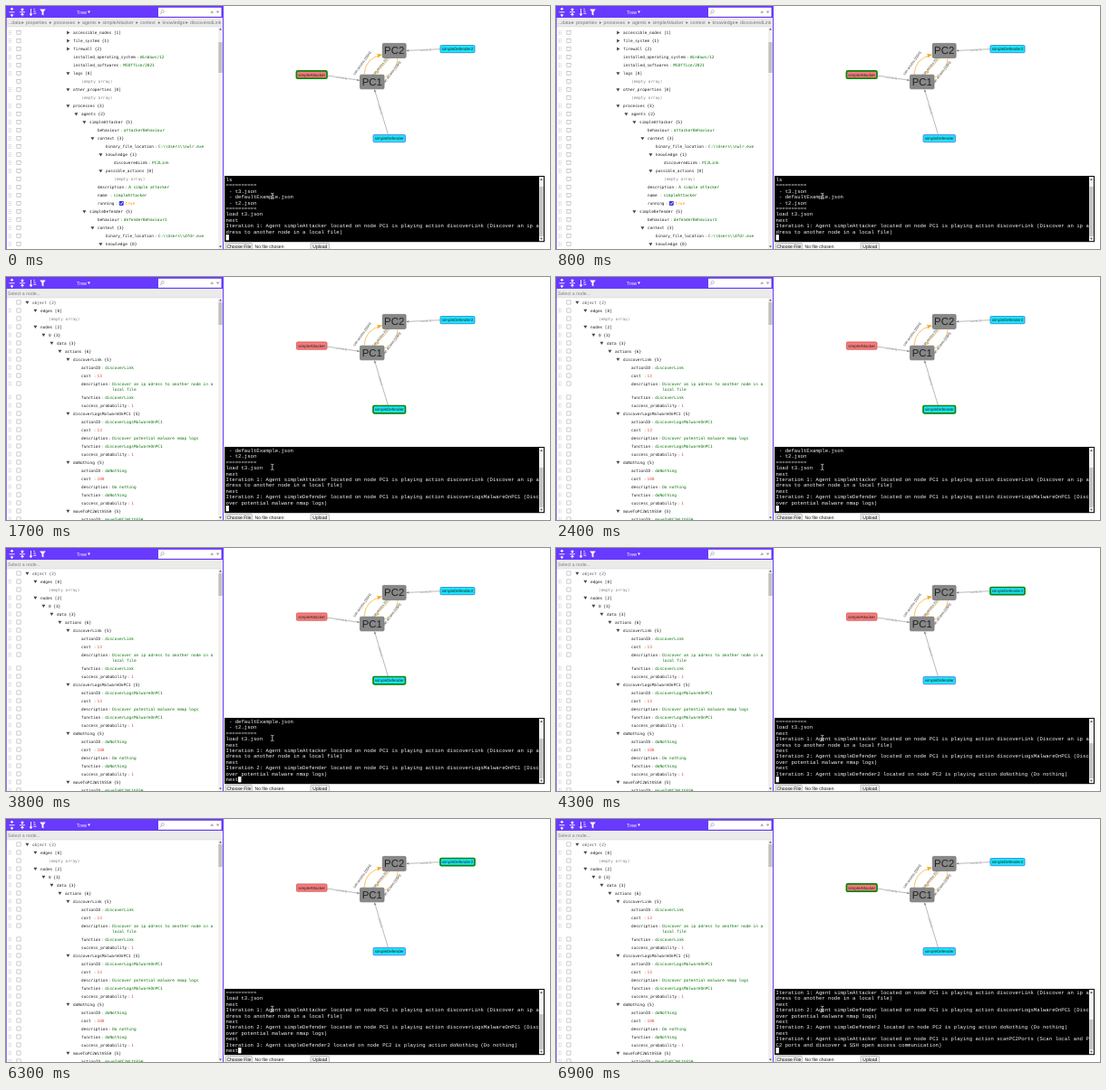
An HTML page that plays this animation: 600x269 px, repeating every 7000 ms.

```html
<!DOCTYPE html>
<html lang="en">
<head>
<meta charset="utf-8">
<title>Agent simulation</title>
<style>
html, body { margin: 0; width: 100%; height: 100%; overflow: hidden; background: #fff; }
svg { display: block; width: 100vw; height: 100vh; }
text { font-family: "Liberation Sans", Arial, sans-serif; white-space: pre; text-rendering: geometricPrecision; }
.tree text { font: 4.4px "DejaVu Sans Mono", monospace; }
.term text { font: 5.65px "Liberation Mono", monospace; }
</style>
</head>
<body>
<svg id="stage" viewBox="0 0 600 269" preserveAspectRatio="none"></svg>
<script>
const LOOP = 7000, COLS = 102, ROWS = 11, LINE = 6.4, CHAR = 3.39, CELL = 2.65;
const INK = '#1a1a1a', GREEN = '#007000', RED = '#ee422e', GRAY = '#808080', VIOLET = '#683aff';

const esc = s => String(s).replace(/&/g, '&amp;').replace(/</g, '&lt;');
const text = (x, y, s, fill = INK, more = '') => `<text x="${x}" y="${y}" fill="${fill}" ${more}>${esc(s)}</text>`;
const rect = (x, y, w, h, fill, more = '') => `<rect x="${x}" y="${y}" width="${w}" height="${h}" fill="${fill}" ${more}/>`;
const path = (d, stroke, width = 0.6, fill = 'none') => `<path d="${d}" stroke="${stroke}" stroke-width="${width}" fill="${fill}"/>`;
const shape = (d, fill) => path(d, 'none', 0, fill);

// Tree rows: [level, key, value]; containers have an open flag ('+' or '-') before the key.
const agent = (name, behaviour) => [
  [7, '-' + name + ' {5}'],
  [8, 'behaviour', behaviour],
  [8, '-context {3}']
];
const scrolledTree = [
  [5, '+accessible_nodes [1]'], [5, '+file_system {1}'], [5, '+firewall {2}'],
  [5, 'installed_operating_system', 'Windows/12'], [5, 'installed_softwares', 'MSOffice/2021'],
  [5, '-logs [0]'], [6], [5, '-other_properties [0]'], [6],
  [5, '-processes {3}'], [6, '-agents {2}'],
  ...agent('simpleAttacker', 'attackerBehaviour'),
  [9, 'binary_file_location', 'C:\\\\Users\\\\nwlr.exe'],
  [9, '-knowledge {1}'], [10, 'discoveredLink', 'PC2Link'],
  [9, '-possible_actions [0]'], [10],
  [8, 'description', 'A simple attacker'], [8, 'name', 'simpleAttacker'], [8, 'running', true],
  ...agent('simpleDefender', 'defenderBehaviour1'),
  [9, 'binary_file_location', 'C:\\\\Users\\\\dfdr.exe'],
  [9, '-knowledge {0}']
];
const action = (name, cost, ...about) => [
  [5, `-${name} {5}`], [6, 'actionID', name], [6, 'cost', cost],
  [6, 'description', ...about], [6, 'function', name], [6, 'success_probability', 1]
];
const topTree = [
  [0, '-object {2}'], [1, '-edges [0]'], [2], [1, '-nodes [2]'],
  [2, '-0 {3}'], [3, '-data {3}'], [4, '-actions {6}'],
  ...action('discoverLink', 13, 'Discover an ip adress to another node in a', 'local file'),
  ...action('discoverLogsMalwareOnPC1', 13, 'Discover potential malware nmap logs'),
  ...action('doNothing', 100, 'Do nothing'),
  ...action('moveToPC2WithSSH', 13, 'Move to PC2').slice(0, 2)
];

function rowGutter(y, drag) {
  let out = rect(11.9, y - 2.1, 4.2, 4.2, '#fff', 'stroke="#999" stroke-width=".5"');
  if (drag) for (let i = 0; i < 6; i++) out += rect(3 + i % 2 * 1.8, y - 2.2 + (i >> 1) * 1.8, 0.9, 0.9, '#bbb');
  return out;
}

function treeRow([level, key, value, more], y) {
  const x = 29 + level * 9, base = y + 1.5;
  let out = rowGutter(y, key && level);
  if (!key) return out + text(x, base, '(empty array)', GRAY);
  if (value === undefined) {
    const d = key[0] === '-' ? `M${x - 7.6} ${y - 1.3}h4l-2 3.2z` : `M${x - 6.8} ${y - 2}v4l3.2-2z`;
    return out + shape(d, '#444') + text(x, base, key.slice(1), level ? INK : '#555');
  }
  const end = x + Math.max(12.5, key.length * CELL);
  out += text(x, base, key) + text(end + 1.2, base, ':', GRAY);
  if (value === true) {
    return out + rect(end + 5.2, y - 2.6, 5, 5, '#3b3bdc', 'rx=".8"')
      + path(`M${end + 6.3} ${y}l1.1 1.2 1.8-2.6`, '#fff', 0.8) + text(end + 12, base, 'true', '#ff8c00');
  }
  out += text(end + 5, base, value, typeof value === 'number' ? RED : GREEN);
  return more ? out + text(end + 5, base + 6.2, more, GREEN) : out;
}

function treePanel(atTop) {
  let y = atTop ? 28 : 29.5, out = '';
  for (const row of atTop ? topTree : scrolledTree) {
    out += treeRow(row, y);
    y += row[3] ? 15 : 9;
  }
  out = `<g class="tree">${out}</g>` + rect(0, 13, 239, 10, '#ebebeb') + rect(0, 22.7, 239, 0.5, '#d3d3d3');
  if (atTop) {
    out += text(2, 20.2, 'Select a node...', '#808080', 'font-size="5.2"');
  } else {
    const crumbs = { '...data': 2, properties: 22, processes: 52.5, agents: 84, simpleAttacker: 106.5, context: 148, knowledge: 172.5, discoveredLink: 203 };
    for (const [name, x] of Object.entries(crumbs)) {
      out += text(x, 20.2, name, '#777', 'font-size="5.2"');
      if (x > 2) out += shape(`M${x - 4.6} 16.9v3l2.4-1.5z`, '#777');
    }
  }
  out += rect(234, 23.2, 5, 246, '#f1f1f1') + rect(234.4, atTop ? 28 : 40, 4.2, atTop ? 25 : 34, '#c1c1c1');
  out += shape('M235 26.6h3l-1.5-2z', '#555') + shape('M235 265.5h3l-1.5 2z', '#555');
  return out + toolbar();
}

function toolbar() {
  const arrows = (x, up, down) => path(`M${x - 3} 6.8h6M${x} 2.2v2.6M${x} 8.8v2.6`, '#fff', 0.9)
    + shape(`M${x - 2} ${up[0]}h4l-2 ${up[1]}zM${x - 2} ${down[0]}h4l-2 ${down[1]}z`, '#fff');
  return rect(0, 0, 240, 13, VIOLET) + rect(0, 13, 0.7, 256, VIOLET) + rect(239, 13, 1, 256, VIOLET)
    + arrows(6.5, [4, -2.4], [9.6, 2.4]) + arrows(18, [3.6, 2.4], [10, -2.4])
    + path('M27.5 3v7.4M30.4 3.6h1.4M30.4 5.9h2.2M30.4 8.2h3', '#fff', 0.9) + shape('M25.6 8.6h3.8l-1.9 2.6z', '#fff')
    + shape('M37.2 3.4h6.6l-2.4 3.2v4l-1.8-1.2v-2.8z', '#fff')
    + text(78, 8.6, 'Tree', '#fff', 'font-size="5.4"') + shape('M90 5.6h3l-1.5 2.4z', '#fff')
    + rect(168, 1.8, 69.5, 10, '#fff')
    + '<circle cx="172.7" cy="6" r="1.6" fill="none" stroke="#aaa" stroke-width=".7"/>'
    + path('M171.6 7.2l-2 2.2', '#aaa', 0.9)
    + shape('M225.2 7.8h4l-2-2.8zM231.6 5.4h4l-2 2.8z', '#aaa');
}

// Network view
const label = (x, y, angle, s, size = 3.2, fill = '#555') =>
  text(0, 1, s, fill, `font-size="${size}" text-anchor="middle" transform="translate(${x} ${y}) rotate(${angle})" stroke="#fff" stroke-width=".7" paint-order="stroke"`);
const head = (x, y, angle, size, fill) =>
  `<path d="M0 0L${-size} ${-size * 0.4}L${-size * 0.8} 0L${-size} ${size * 0.4}z" fill="${fill}" transform="translate(${x} ${y}) rotate(${angle})"/>`;

function link(x1, y1, x2, y2, lx, ly) {
  const angle = Math.atan2(y2 - y1, x2 - x1) * 180 / Math.PI;
  const upright = Math.abs(angle) > 90 ? angle + 180 : angle;
  return path(`M${x1} ${y1}L${x2} ${y2}`, '#8a8a8a', 0.6) + head(x2, y2, angle, 3, '#777') + label(lx, ly, upright, 'connects');
}

function box(x, y, w, h, name, fill, border, selected, size = 4.55) {
  const stroke = selected ? '#0a850a' : border;
  return rect(x, y, w, h, fill, `rx="1.3" stroke="${stroke}" stroke-width="${selected ? 1.7 : 0.8}"`)
    + text(x + w / 2, y + h / 2 + size * 0.35, name, '#222', `font-size="${size}" text-anchor="middle"`);
}

function network(active) {
  const orange = '#f5a81c', cyan = '#19e6f7', access = 'can access (SSH)';
  return link(354, 77, 390, 82.3, 370, 79.5)
    + link(479, 47.7, 441.5, 49.4, 463, 48.5)
    + link(421.5, 142.5, 406.5, 92.5, 413, 114.5)
    + path('M395 76Q396 58 414 54', orange, 0.7) + head(415, 53.8, -12, 6, orange)
    + path('M407 76L423 58', orange, 0.7) + head(407.5, 75.5, 131, 5, orange)
    + path('M432 58Q432 71 418 79', orange, 0.7) + head(431.8, 62, -80, 5, orange)
    + label(393, 63.5, -54, access, 3.9, '#333')
    + label(414, 65.5, -50, access, 3.6, '#333')
    + label(425.5, 74, -52, access, 3.9, '#333')
    + box(390.5, 76.2, 26.5, 15.6, 'PC1', '#888', '#777', false, 11.4)
    + box(415.3, 41.4, 25.8, 16, 'PC2', '#888', '#777', false, 11.4)
    + box(320.4, 71.9, 33.6, 8.3, 'simpleAttacker', '#f47c7c', '#d85050', active === 0)
    + box(405, 142.5, 35.5, 8.3, 'simpleDefender', cyan, '#5b6cf5', active === 1)
    + box(479, 43.5, 38, 8.2, 'simpleDefender2', cyan, '#2b7ce9', active === 2);
}

// Terminal session
const boot = ['ls', '==========', ' - t3.json', ' - defaultExample.json', ' - t2.json', '==========', 'load t3.json', 'next'];
const play = (n, who, node, what, about) =>
  `Iteration ${n}: Agent ${who} located on node ${node} is playing action ${what} (${about})`;
const turns = [
  { out: 0, agent: 0, say: play(1, 'simpleAttacker', 'PC1', 'discoverLink', 'Discover an ip adress to another node in a local file') },
  { type: 1000, enter: 1500, out: 1700, agent: 1, say: play(2, 'simpleDefender', 'PC1', 'discoverLogsMalwareOnPC1', 'Discover potential malware nmap logs') },
  { type: 3150, enter: 4000, out: 4200, agent: 2, say: play(3, 'simpleDefender2', 'PC2', 'doNothing', 'Do nothing') },
  { type: 6000, enter: 6500, out: 6700, agent: 0, say: play(4, 'simpleAttacker', 'PC1', 'scanPC2Ports', 'Scan local and PC2 ports and discover a SSH open access communication') }
];

function stateAt(t) {
  const state = { lines: [...boot], input: '', active: 0, atTop: t >= turns[1].out };
  for (const { type, enter, out, agent, say } of turns) {
    if (t >= enter) state.lines.push('next');
    else if (t >= type) state.input = 'next'.slice(0, 1 + Math.floor((t - type) / 33));
    if (t >= out) {
      for (let i = 0; i < say.length; i += COLS) state.lines.push(say.slice(i, i + COLS));
      state.active = agent;
    }
  }
  return state;
}

function terminal(lines, input) {
  const shown = [...lines, input].slice(-ROWS);
  const thumb = 60 * ROWS / (lines.length + 2);
  const cursorY = 189.1 + (shown.length - 1) * LINE;
  return rect(241, 188, 353, 73.2, '#000')
    + `<g class="term">${shown.map((s, i) => text(242.5, (193.9 + i * LINE).toFixed(2), s, '#f4f4f4')).join('')}</g>`
    + rect(242.5 + input.length * CHAR, cursorY, CHAR, 6.3, '#fff')
    + rect(588, 189, 5, 71.2, '#f1f1f1') + rect(588.4, 255 - thumb, 4.2, thumb, '#c1c1c1')
    + shape('M589 193h3l-1.5-2zM589 256.8h3l-1.5 2z', '#555');
}

function uploadBar() {
  const button = (x, w, s) => rect(x, 262.6, w, 7.4, '#efefef', 'rx=".8" stroke="#888" stroke-width=".5"')
    + text(x + w / 2, 267.8, s, '#111', 'font-size="5.05" text-anchor="middle"');
  return button(242.4, 29, 'Choose File') + text(274.5, 267.8, 'No file chosen', '#111', 'font-size="5.05"') + button(336, 20.5, 'Upload');
}

const pointer = path('M292.2 207.2q1.4 0 1.6 1v4.4q-.2 1-1.6 1M295.4 207.2q-1.4 0-1.6 1M295.4 213.6q-1.4 0-1.6-1', '#fff', 0.7);

const stage = document.getElementById('stage');
let last = '';

function draw(t) {
  const { lines, input, active, atTop } = stateAt(t);
  const key = [lines.length, input, active, atTop].join();
  if (key === last) return;
  last = key;
  stage.innerHTML = rect(0, 0, 600, 269, '#fff') + treePanel(atTop) + network(active)
    + terminal(lines, input) + uploadBar() + pointer;
}

const start = performance.now();
function tick() {
  draw((performance.now() - start) % LOOP);
  requestAnimationFrame(tick);
}
tick();
</script>
</body>
</html>
```
